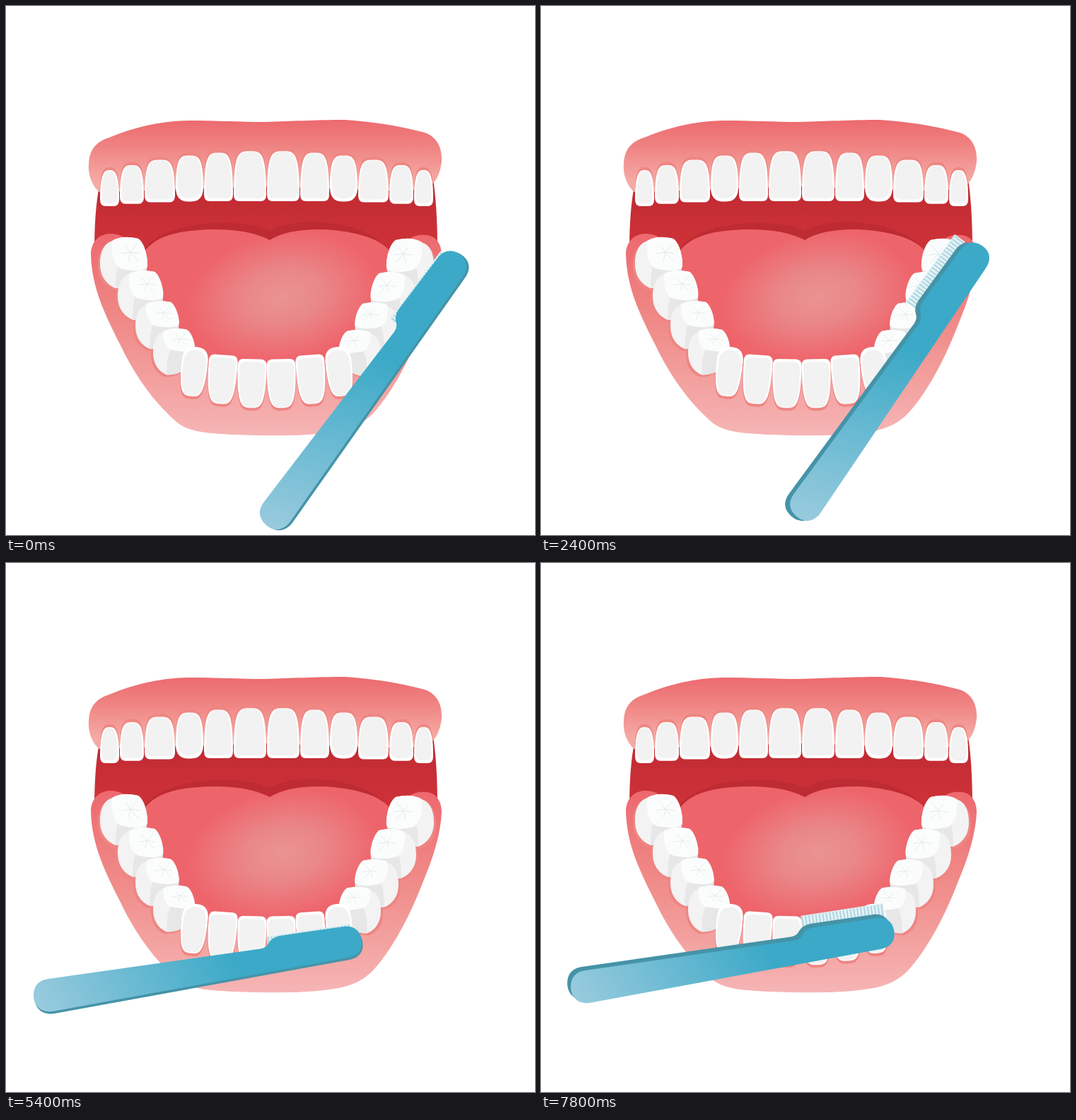
These frames come from a looping animation (748x748 px, 8100 ms). An HTML page:

```html
<!DOCTYPE html>
<html lang="en">
<head>
<meta charset="utf-8">
<title>Brushing teeth</title>
<style>
  html, body { margin: 0; width: 100%; height: 100%; overflow: hidden; background: #fff; }
  svg { display: block; width: 100%; height: 100%; }
</style>
</head>
<body>
<svg viewBox="0 0 748 748">
  <defs>
    <linearGradient id="upperGum" x2="0" y2="1">
      <stop offset="0" stop-color="#ec6a6f"/><stop offset=".35" stop-color="#ef8281"/><stop offset=".85" stop-color="#f5aaa4"/>
    </linearGradient>
    <linearGradient id="lowerGum" x2="0" y2="1">
      <stop offset="0" stop-color="#ed686e"/><stop offset=".5" stop-color="#f08f8c"/><stop offset="1" stop-color="#f6b5b5"/>
    </linearGradient>
    <linearGradient id="throat" x2="0" y2="1">
      <stop offset=".1" stop-color="#c12b32"/><stop offset=".55" stop-color="#cd3138"/>
    </linearGradient>
    <radialGradient id="tongue" gradientUnits="userSpaceOnUse" cx="0" cy="0" r="138" gradientTransform="translate(392 411) rotate(-10) scale(1 .66)">
      <stop offset="0" stop-color="#e99492"/><stop offset=".4" stop-color="#ea8788"/><stop offset="1" stop-color="#ee646b"/>
    </radialGradient>
    <linearGradient id="handle" gradientUnits="userSpaceOnUse" x1="80" y1="680" x2="315" y2="545">
      <stop offset="0" stop-color="#97cadd"/><stop offset="1" stop-color="#3ba9c7"/>
    </linearGradient>
    <path id="brushShape" d="M60 588 L360 545.500 Q368 544 371 538 Q376 529 388 527 L478 514 C495 512 503 524 503 537 C503 549 495 556 483 558 L66 634 C50 636 39 627 39 611 C39 598 46 590 60 588Z"/>
  </defs>
  <path fill="url(#throat)" d="M133 250 Q125 285 125 345 L200 400 H540 L610 345 Q610 285 604 245Z"/>
  <path fill="#bf2b32" d="M195 345 C215 315 270 305 320 307 Q355 309 373 318 Q395 305 435 305 C490 307 530 325 543 348Z"/>
  <path fill="url(#upperGum)" d="M132 263 C117 250 115 230 118 214 C121 200 130 191 146 186 C180 172 215 163 258 162 C300 162 330 164 365 164 C405 163 435 161 480 161 C525 164 562 171 592 179 C612 186 617 204 616 220 C614 236 609 246 603 252 L570 262 L368 255 L165 262Z"/>
  <path fill="url(#lowerGum)" d="M120 350 C121 330 135 321 150 322 Q165 323 172 332 L215 430 L270 500 L370 510 L470 500 L525 430 L568 331 C577 324 586 323 595 324 C608 325 616 337 616 352 C615 382 604 417 590 450 C570 502 546 546 520 575 C501 595 480 601 450 604 C420 608 370 608 320 606 C280 604 258 602 241 588 C211 562 184 526 162 480 C141 438 121 400 120 350Z"/>
  <path fill="url(#tongue)" d="M194 350 C212 320 260 316 300 316 C335 317 355 322 373 331 C390 320 415 315 450 316 C490 318 532 328 545 350 C540 400 515 450 480 480 L460 510 H280 L240 475 C210 430 198 390 194 350Z"/>
  <g id="teeth"></g>
  <g id="brush">
    <g id="bristles" fill="none" stroke-width="18">
      <path stroke="#e1f1f5" d="M370 539 L488 521"/>
      <path stroke="#a5d0dd" stroke-width="17" stroke-dasharray="1.600 3.400" d="M371 539.500 L488 521.500"/>
    </g>
    <use id="side" href="#brushShape" fill="#4593a8"/>
    <use href="#brushShape" fill="url(#handle)"/>
  </g>
</svg>
<script>
const byId = id => document.getElementById(id);
const shape = (d, fill, extra = '') => `<path d="${d}" fill="${fill}" ${extra}/>`;
const GUM_SHADE = '#ee8683';
const MIDDLE = 368.5;
const CANINE = 2;

// Front tooth outline: "root" is the rounded end, "edge" the biting end.
function outline(l, r, root, edge, corner) {
  const side = edge - Math.sign(edge - root) * corner * 1.2;
  return `M${l} ${side} Q${l} ${edge} ${l + corner} ${edge} H${r - corner} Q${r} ${edge} ${r} ${side}
    C${r} ${root} ${r - 8} ${root} ${(l + r) / 2} ${root} C${l + 8} ${root} ${l} ${root} ${l} ${side}Z`;
}

function frontTooth(x, width, root, edge, corner, tilt) {
  const l = x - width / 2, r = x + width / 2, s = Math.sign(edge - root);
  const turn = `transform="rotate(${tilt} ${x} ${(root + edge) / 2})"`;
  return {
    shade: shape(outline(l, r, root - 4 * s, edge - 8 * s, corner), GUM_SHADE, turn),
    body: shape(outline(l, r, root, edge, corner), '#fff', turn) +
      shape(outline(l + 2.5, r - 2.5, root + s, edge - 4 * s, corner), '#f2f2f2', turn)
  };
}

// Teeth from the middle outwards on both sides; root and edge follow arcs.
function frontRow(widths, rootAt, edgeAt, lean) {
  let reach = 0;
  return widths.flatMap((width, i) => {
    const d = reach + width / 2;
    reach += width;
    return [-1, 1].map(side => frontTooth(MIDDLE + side * d, width - 1,
      rootAt(d), edgeAt(d), i === CANINE ? 17 : 8, -side * d * lean));
  });
}

// Molar drawn in a 67 x 73 box, i steps from the back.
function molar(i) {
  const x = 133 + 25 * i, y = 327 + 49 * i - 2 * i * i;
  const place = `transform="translate(${x} ${y}) scale(${1 - .04 * i} ${1 - .03 * i})"`;
  const body = 'M15 6 C3 11 0 25 0 38 C0 55 9 67 22 72 C40 73 59 63 66 45 C69 28 63 8 54 2 C39 -2 25 1 15 6Z';
  return {
    shade: `<g transform="translate(-3 3)">${shape(body, GUM_SHADE, place)}</g>`,
    body: `<g ${place}>` + shape(body, '#f3f3f3') +
      shape('M22 72 C22 55 23 40 30 30 L67 30 L66 45 C59 63 40 73 22 72Z', '#e7e7e7') +
      `<g transform="scale(1 ${1 - .08 * i})">` +
      shape('M17 5 C15 22 19 43 33 45 C47 48 64 49 67 41 C68 28 61 6 54 2 C37 -2 25 0 17 5Z', '#fbfdfd') +
      shape('M30 23 L43 21 L53 9 M36 12 L43 21 L54 34 M43 21 L56 23 M43 21 L40 33', 'none', 'stroke="#e4e9e9"') +
      '</g></g>'
  };
}

const upper = frontRow([47, 42, 40, 44, 35, 28],
  d => 205 + 27 * (d / 222) ** 2, d => 276 + 7 * (d / 222) ** 4, 0);
const lower = frontRow([42, 42, 38],
  d => 569 - 17 * (d / 103) ** 2, d => 500 - 18 * (d / 103) ** 2, .06);
const molars = [0, 1, 2, 3].map(molar);

const join = (list, part) => list.map(t => t[part]).join('');
const bothSides = s => s + `<g transform="translate(${2 * MIDDLE + 1} 2) scale(-1 1)">${s}</g>`;
byId('teeth').innerHTML = ['shade', 'body'].map(part =>
  join(upper, part) + bothSides(join(molars, part)) + join(lower, part)).join('');

// Head position and turn of the brush at the start and end of a stroke.
const spots = [
  [[628, 371, -44.5], [611, 359, -45.5]],
  [[572.5, 463, -27], [569.5, 452, -27.5]],
  [[479, 537, 0], [476, 525, 0]]
];
const rolls = [0, .3, 1];
const STEP = 300;
const mix = (a, b, k) => a + (b - a) * k;

function draw(now) {
  const step = Math.floor(now / STEP) % 27;
  const k = rolls[step % 3];
  const [from, to] = spots[Math.floor(step / 9)];
  const [x, y, turn] = from.map((v, i) => mix(v, to[i], k));
  byId('brush').setAttribute('transform',
    `translate(${x} ${y}) rotate(${turn}) scale(${mix(1, .986, k)} 1) translate(-479 -537)`);
  byId('side').setAttribute('transform', `translate(${mix(1.5, -5, k)} ${mix(3.3, -5, k)})`);
  byId('bristles').setAttribute('transform', `translate(0 ${mix(-2, -19, k)})`);
}

const start = performance.now();
function tick() {
  draw(performance.now() - start);
  requestAnimationFrame(tick);
}
tick();
</script>
</body>
</html>
```
